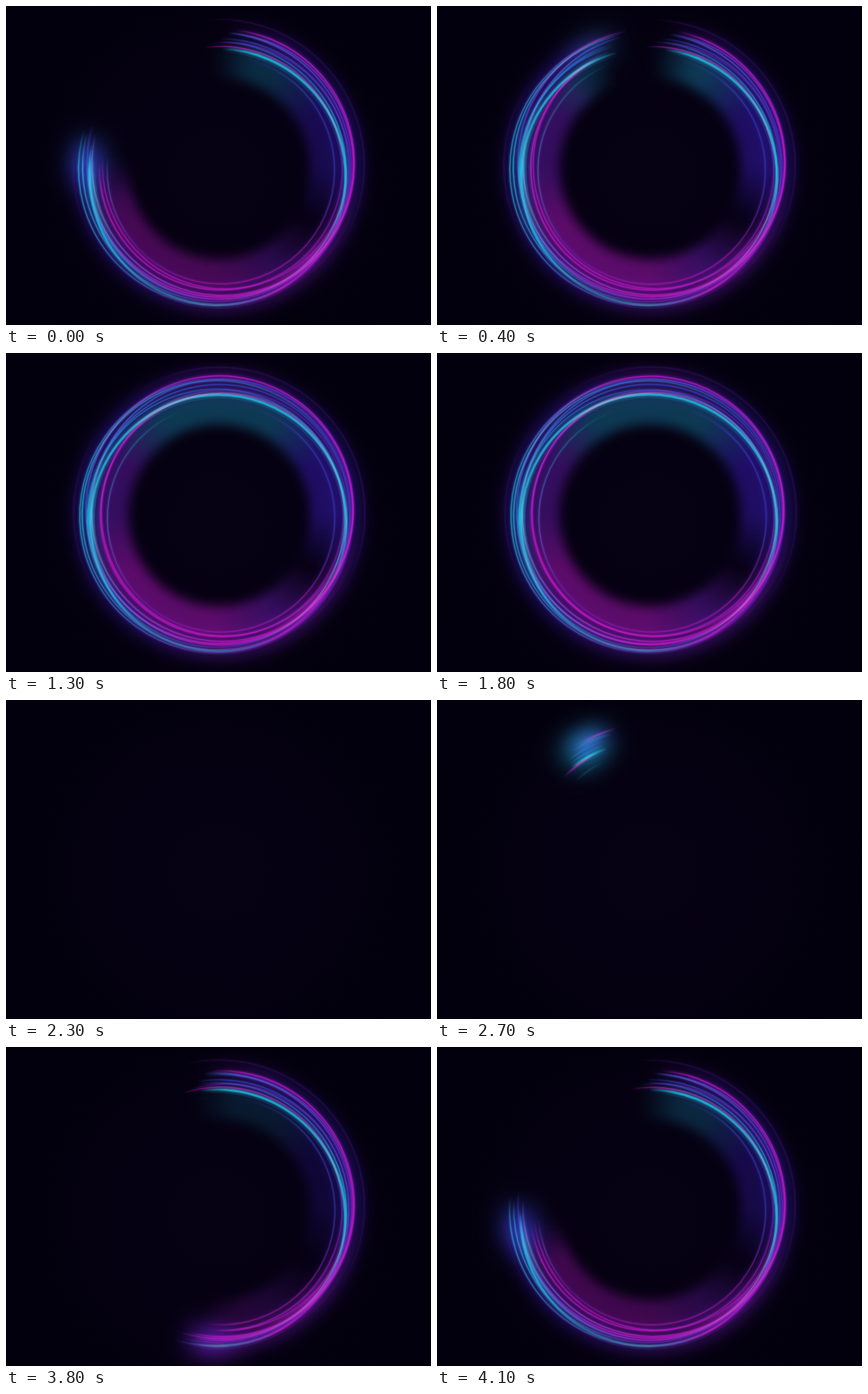
An HTML page with a canvas for the animation above (4200 ms loop, 598 by 448 pixels).

```html
<!DOCTYPE html>
<html>
<head>
<meta charset="utf-8">
<title>Neon ring</title>
<style>
  html, body { margin: 0; width: 100%; height: 100%; overflow: hidden; background: #03000c; }
  canvas { display: block; }
</style>
</head>
<body>
<canvas id="stage" width="598" height="448"></canvas>
<script>
const ctx = document.getElementById('stage').getContext('2d');
const LOOP = 4200, START = 2400, RAD = Math.PI / 180;

const COLORS = {
  C: [30, 200, 235], T: [20, 130, 155], B: [55, 75, 215], I: [60, 30, 190],
  V: [110, 30, 180], M: [200, 25, 205], L: [105, 125, 220], '-': [0, 0, 0]
};

// Palettes run clockwise from the right in equal steps.
// x, y, radius, width, lead in degrees, palette, strength
const LINES = [
  [298, 239, 180, 2.6, 10, 'CVMTTCCCCCCC', 1],
  [301, 221, 188, 1.8, 14, 'MMBM', .85],
  [297, 227, 189, 1.5, 12, 'VVCT', .75],
  [295, 228, 192, 1.5, 14, 'IVCV', .7],
  [300, 228, 183, 1.4, 8, 'BMCB', .7],
  [308, 225, 173, 1.3, 2, 'VMMV', .7],
  [303, 231, 160, 1.4, 4, 'BMMVLT-B', .5],
  [303, 227, 171, 1.5, 0, 'VMMM', .75],
  [304, 222, 184, 1.6, 11, 'MMLB', .8],
  [297, 232, 181, 1.5, 9, 'CVCB', .7],
  [300, 224, 205, 1.5, 4, 'V---V-VV', .2],
  [303, 224, 181, 8, 8, '-M------', .6],
  [299, 232, 180, 7, 4, '----C---', .6]
];

const HEAD = [[2400, -150], [2700, -103], [3000, -60], [3400, 3], [3600, 57],
  [4100, 187], [4200, 198], [4850, 300], [6600, 300]];
const TAIL = [[2400, -150], [2700, -137], [3400, -119], [4100, -100], [4200, -98],
  [4850, -90], [6600, -90]];

const clamp = v => Math.max(0, Math.min(1, v));
const ramp = (t, from, to) => clamp((t - from) / (to - from));

function track(keys, t) {
  const i = Math.max(1, keys.findIndex(k => k[0] >= t));
  const [t0, a] = keys[i - 1], [t1, b] = keys[i];
  return a + (b - a) * ramp(t, t0, t1);
}

function shade(palette, degrees, alpha) {
  const n = palette.length;
  const p = ((degrees % 360 + 360) % 360) / 360 * n;
  const i = Math.floor(p), f = p - i;
  const a = COLORS[palette[i % n]], b = COLORS[palette[(i + 1) % n]];
  return `rgba(${a.map((v, k) => Math.round(v + (b[k] - v) * f))},${alpha.toFixed(3)})`;
}

function trail(x, y, r, palette, alpha, tail, head, fade, widths) {
  const span = Math.min(360, head - tail);
  if (span <= 0 || alpha <= 0) return;
  const soft = Math.max(.01, Math.min(fade, span / 2, 360 - span));
  const gradient = ctx.createConicGradient(tail * RAD, x, y);
  for (let d = 0; d <= 360; d += 3) {
    const edge = span === 360 ? 1 : clamp(Math.min(d, span - d) / soft);
    gradient.addColorStop(d / 360, shade(palette, tail + d, alpha * edge));
  }
  ctx.strokeStyle = gradient;
  for (const [width, strength] of widths) {
    ctx.globalAlpha = strength;
    ctx.lineWidth = width;
    ctx.beginPath();
    ctx.arc(x, y, r, tail * RAD, (tail + span) * RAD);
    ctx.stroke();
  }
  ctx.globalAlpha = 1;
}

function haze(blur, width, ...arc) {
  ctx.filter = `blur(${blur}px)`;
  trail(...arc, [[width, 1]]);
  ctx.filter = 'none';
}

function backdrop() {
  const g = ctx.createRadialGradient(299, 240, 60, 299, 240, 330);
  g.addColorStop(0, '#060113');
  g.addColorStop(1, '#02000c');
  ctx.globalCompositeOperation = 'source-over';
  ctx.fillStyle = g;
  ctx.fillRect(0, 0, 598, 448);
}

function draw(now) {
  const time = now % LOOP;
  const t = time < START ? time + LOOP : time;
  const head = track(HEAD, t), tail = track(TAIL, t);
  const light = ramp(t, 2430, 2600) * (1 - ramp(t, 6050, 6480));
  const band = light * (.06 + .94 * ramp(t, 3300, 4500)) * .43;
  const glow = ramp(t, 2430, 2650) * (1 - ramp(t, 4250, 4750)) * .75;
  backdrop();

  ctx.globalCompositeOperation = 'lighter';
  haze(8, 46, 300, 228, 151, 'I-VMMMVVTTTI', band, tail + 4, head - 12, 22);
  haze(11, 28, 299, 227, 188, 'IVVIIIVI', light * .42, tail + 10, head - 4, 25);
  haze(16, 46, 299, 228, 184, 'IVVIBCCB', glow, head - 30, head - 2, 14);

  // Lighten keeps crossing strands in their own colours.
  ctx.globalCompositeOperation = 'lighten';
  LINES.forEach(([x, y, r, width, lead, palette, strength], i) => {
    const phase = time / LOOP * 2 * Math.PI + i * 1.7;
    trail(x + Math.sin(phase), y + Math.cos(phase), r, palette,
      light * strength, tail + lead, head - 16 + lead, 14,
      [[width * 4, .14], [width * 1.8, .4], [width * .9, .6]]);
  });
}

function tick() {
  draw(performance.now());
  requestAnimationFrame(tick);
}
tick();
</script>
</body>
</html>
```
